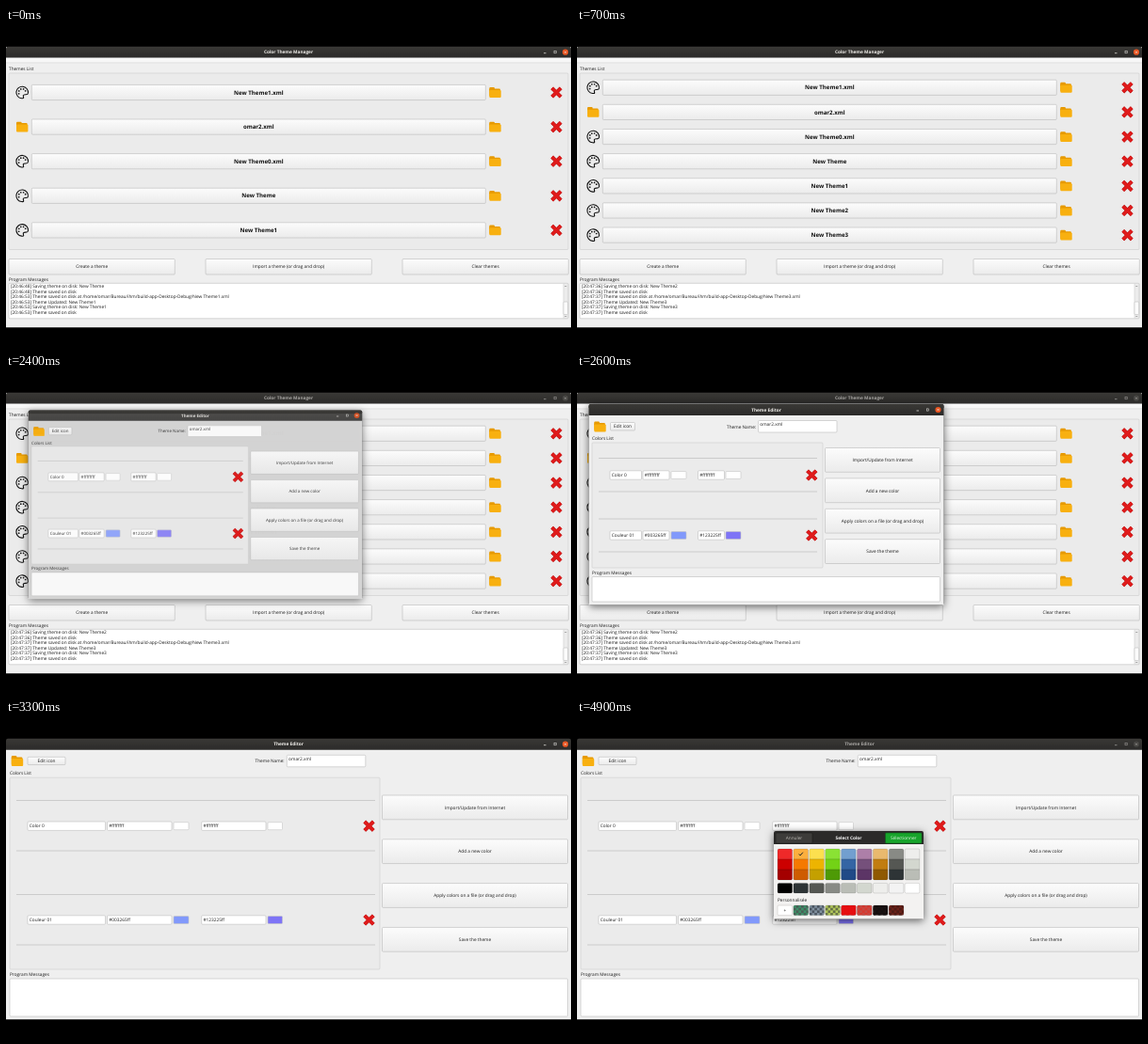
Animation, 600 px wide and 338 px high, one loop 5000 ms. Source, as an HTML page with a canvas:

```html
<!DOCTYPE html>
<html lang="en">
<head>
<meta charset="utf-8">
<title>Color Theme Manager</title>
<style>
  html, body { margin: 0; width: 100%; height: 100%; overflow: hidden; background: #000; }
  canvas { display: block; }
</style>
</head>
<body>
<canvas id="stage" width="600" height="338"></canvas>
<script>
const ctx = document.getElementById('stage').getContext('2d');
const LOOP = 5000, STEP = 100;
const BG = '#efefef', RED = '#e01b1b';
const USER = 'omar';

function rect(x, y, w, h, fill) {
  ctx.fillStyle = fill;
  ctx.fillRect(x, y, w, h);
}

function box(x, y, w, h, fill, stroke, r = 1) {
  ctx.beginPath();
  ctx.roundRect(x, y, w, h, r);
  ctx.fillStyle = fill;
  ctx.fill();
  if (!stroke) return;
  ctx.strokeStyle = stroke;
  ctx.lineWidth = 0.6;
  ctx.stroke();
}

function text(str, x, y, { size = 4.75, bold = false, align = 'left', color = '#1c1c1c' } = {}) {
  ctx.font = `${bold ? 'bold ' : ''}${size}px "Open Sans", sans-serif`;
  ctx.textRendering = 'geometricPrecision';
  ctx.textAlign = align;
  ctx.fillStyle = color;
  ctx.fillText(str, x, y + size * 0.36);
}

function line(points, color, width = 0.7) {
  ctx.beginPath();
  points.forEach(([x, y]) => ctx.lineTo(x, y));
  ctx.strokeStyle = color;
  ctx.lineWidth = width;
  ctx.stroke();
}

function button(label, x, y, w, h, style) {
  const g = ctx.createLinearGradient(0, y, 0, y + h);
  g.addColorStop(0, '#fcfcfc');
  g.addColorStop(1, '#ebebeb');
  box(x, y, w, h, g, '#b9b9b9');
  text(label, x + w / 2, y + h / 2, { align: 'center', ...style });
}

function field(label, x, y, w, h, textY = y + h / 2) {
  box(x, y, w, h, '#fff', '#bcbcbc');
  text(label, x + 1.8, textY);
}

function at(x, y, draw) {
  ctx.save();
  ctx.translate(x, y);
  draw();
  ctx.restore();
}

function folder(x, y) {
  at(x, y, () => {
    box(-6.2, -5.4, 5.6, 4, '#e79a00');
    box(-6.2, -4, 11.6, 8, '#e79a00');
    box(-6.2, -2.6, 12.4, 8, '#f8b010');
  });
}

function cross(x, y) {
  at(x, y, () => {
    for (const [color, width] of [['#b01515', 4], [RED, 3.2]]) {
      line([[-4.7, -4.7], [4.7, 4.7]], color, width);
      line([[-4.7, 4.7], [4.7, -4.7]], color, width);
    }
  });
}

function palette(x, y) {
  at(x, y, () => {
    ctx.beginPath();
    ctx.arc(0, 0, 6.3, 0.1, 1.5, true);
    ctx.bezierCurveTo(3, 6, -0.2, 3.8, 1.6, 2.6);
    ctx.bezierCurveTo(3, 1.6, 6, 3.4, 6.3, 0.6);
    ctx.strokeStyle = '#111';
    ctx.lineWidth = 1.1;
    ctx.stroke();
    ctx.fillStyle = '#111';
    for (const a of [-0.45, -1.2, -1.95, -2.7, -3.5]) {
      ctx.beginPath();
      ctx.arc(3.8 * Math.cos(a), 3.8 * Math.sin(a), 0.85, 0, 7);
      ctx.fill();
    }
  });
}

function titleBar(title, x, y, w, active) {
  const ink = active ? '#f4f2ee' : '#aaa8a5';
  const g = ctx.createLinearGradient(0, y, 0, y + 12);
  g.addColorStop(0, '#3a3936');
  g.addColorStop(1, '#2b2a29');
  box(x, y, w, 12, g, null, [2, 2, 0, 0]);
  text(title, x + w / 2, y + 6, { bold: true, align: 'center', color: ink });
  const cy = y + 6, right = x + w - 6;
  line([[right - 23, cy + 1], [right - 20.5, cy + 1]], ink);
  ctx.strokeStyle = ink;
  ctx.lineWidth = 0.5;
  ctx.strokeRect(right - 12, cy - 1.1, 2.2, 2.2);
  ctx.beginPath();
  ctx.arc(right, cy, 3.1, 0, 7);
  ctx.fillStyle = active ? '#e95420' : '#454441';
  ctx.fill();
  line([[right - 1.1, cy - 1.1], [right + 1.1, cy + 1.1]], ink, 0.6);
  line([[right - 1.1, cy + 1.1], [right + 1.1, cy - 1.1]], ink, 0.6);
}

const themes = ['New Theme1.xml', USER + '2.xml', 'New Theme0.xml',
  'New Theme', 'New Theme1', 'New Theme2', 'New Theme3'];

function logLines(count) {
  const stamps = { 4: '20:46:48', 5: '20:46:53', 6: '20:47:36', 7: '20:47:37' };
  const now = `[${stamps[count]}] `, before = `[${stamps[count - 1]}] `;
  const name = themes[count - 1];
  return [
    `${before}Saving theme on disk: ${themes[count - 2]}`,
    `${before}Theme saved on disk`,
    `${now}Theme saved on disk at /home/${USER}/Bureau/ihm/build-app-Desktop-Debug/${name}.xml`,
    `${now}Theme Updated: ${name}`,
    `${now}Saving theme on disk: ${name}`,
    `${now}Theme saved on disk`,
  ];
}

function manager(count, active) {
  rect(0, 20, 600, 298.5, BG);
  titleBar('Color Theme Manager', 0, 19.7, 600, active);
  rect(0, 31.7, 600, 5, '#f7f7f7');
  line([[0, 37], [600, 37]], '#d9d9d9');
  text('Themes List', 3, 43.3);
  box(3, 48, 594, 187.5, '#ebebeb', '#cdcdcd');
  const gap = 183 / count;
  for (let i = 0; i < count; i++) {
    const y = 141.7 + (i - (count - 1) / 2) * gap;
    (i === 1 ? folder : palette)(17.2, y);
    button(themes[i], 27.3, y - 8.1, 482, 16.2, { bold: true, size: 6.1, color: '#111' });
    folder(519.5, y);
    cross(584.5, y);
  }
  ['Create a theme', 'Import a theme (or drag and drop)', 'Clear themes']
    .forEach((label, i) => button(label, 3 + i * 209, 245.5, 176.3, 16.5));
  text('Program Messages', 3, 267);
  box(3, 271.3, 594, 37.5, '#fff', '#bcbcbc');
  logLines(count).forEach((str, i) => text(str, 5, 274.6 + i * 5.5));
  box(592, 271.6, 4.7, 37, '#ececec', '#d2d2d2', 0);
  box(592, 291, 4.7, 13.5, '#fbfbfb', '#bcbcbc');
  line([[593.4, 275], [594.3, 274], [595.2, 275]], '#555', 0.5);
  line([[593.4, 306], [594.3, 307], [595.2, 306]], '#555', 0.5);
}

// Each [a, b] pair is a start and an end coordinate.
const floating = {
  x: 12.5, y: 32, w: 377, h: 213.5,
  icon: [24.5, 56], edit: [35.5, 51.5, 26, 8.5], nameX: 159, nameField: [192.5, 49.5, 83.5, 12.5],
  left: 16, right: 385.5, listY: 68.7, group: [73, 206], groupRight: 261,
  rules: [89.5, 125, 154, 189], ruleX: [23, 255], rows: [107.5, 171.5],
  cols: [[35, 68.5], [70, 98], [100, 116], [128.5, 156.5], [158, 174]], crossX: 249.3,
  actionX: 263.5, actionY: 78.5, actionGap: 32.4, messages: [211, 215.5, 242],
};
const maximized = {
  x: 0, y: 19.7, w: 600, h: 298.8,
  icon: [12, 43.5], edit: [23, 39.3, 40, 8.3], nameX: 264.5, nameField: [298.3, 37.3, 83.5, 12.5],
  left: 4, right: 596.5, listY: 56.5, group: [61.2, 265], groupRight: 397,
  rules: [85.5, 139, 185.5, 239], ruleX: [11, 392], rows: [112.7, 212.5],
  cols: [[23, 105.5], [107.5, 176], [178, 194], [207.7, 276], [278, 293.5]], crossX: 385.5,
  actionX: 399.5, actionY: 80, actionGap: 46.8, messages: [270, 275, 315],
};
const colors = [
  ['Color 0', '#ffffffff', '#fff', '#ffffffff', '#fff'],
  ['Couleur 01', '#003265ff', '#8199fb', '#123225ff', '#7e74f6'],
];

function editor(l, active) {
  rect(l.x, l.y + 4, l.w, l.h - 4, BG);
  titleBar('Theme Editor', l.x, l.y, l.w, active);
  folder(...l.icon);
  button('Edit icon', ...l.edit);
  text('Theme Name:', l.nameX, l.nameField[1] + 6.4);
  field(USER + '2.xml', ...l.nameField, l.nameField[1] + 4.2);

  text('Colors List', l.left, l.listY);
  box(l.left, l.group[0], l.groupRight - l.left, l.group[1] - l.group[0], '#ebebeb', '#cdcdcd');
  for (const y of l.rules) line([[l.ruleX[0], y], [l.ruleX[1], y]], '#bebebe');
  l.rows.forEach((y, row) => {
    l.cols.forEach(([a, b], i) => {
      const value = colors[row][i];
      if (i === 2 || i === 4) box(a, y - 4, b - a, 8, value, '#c4c4c4');
      else field(value, a, y - 4.7, b - a, 9.4);
    });
    cross(l.crossX, y);
  });

  ['Import/Update from Internet', 'Add a new color',
    'Apply colors on a file (or drag and drop)', 'Save the theme']
    .forEach((label, i) =>
      button(label, l.actionX, l.actionY + i * l.actionGap, l.right - l.actionX, 25.8));
  const [labelY, top, bottom] = l.messages;
  text('Program Messages', l.left, labelY);
  box(l.left, top, l.right - l.left, bottom - top, '#fff', '#bcbcbc');
}

function withShadow(x, y, w, h) {
  ctx.save();
  ctx.shadowColor = 'rgba(0,0,0,.6)';
  ctx.shadowBlur = 9;
  ctx.shadowOffsetY = 2;
  box(x, y, w, h, '#2b2a29', null, 2);
  ctx.restore();
}

// Draws a layout stretched into another rectangle.
function fitted(l, r, alpha) {
  ctx.save();
  ctx.globalAlpha = alpha;
  ctx.translate(r.x, r.y);
  ctx.scale(r.w / l.w, r.h / l.h);
  ctx.translate(-l.x, -l.y);
  editor(l, true);
  ctx.restore();
}

function maximizing(p) {
  const r = {};
  for (const k of ['x', 'y', 'w', 'h']) r[k] = floating[k] + (maximized[k] - floating[k]) * p;
  withShadow(r.x, r.y, r.w, r.h);
  fitted(maximized, r, 1);
  fitted(floating, r, 0.14);
}

function popIn(cx, cy, scale, alpha, draw) {
  ctx.save();
  ctx.globalAlpha = alpha;
  ctx.translate(cx, cy);
  ctx.scale(scale, scale);
  ctx.translate(-cx, -cy);
  draw();
  ctx.restore();
}

const swatches = [
  ['#ef2929', '#cc0000', '#a40000'], ['#fcaf3e', '#f57900', '#ce5c00'],
  ['#fce04f', '#edb400', '#c4a000'], ['#8ae234', '#73d216', '#4e9a06'],
  ['#729fcf', '#3465a4', '#204a87'], ['#ad7fa8', '#75507b', '#5c3566'],
  ['#e9b96e', '#c17d11', '#8f5902'], ['#888a85', '#555753', '#2e3436'],
  ['#eeeeec', '#d3d7cf', '#babdb6'],
];
const greys = ['#000', '#2e3436', '#555753', '#888a85', '#babdb6', '#d3d7cf', '#eeeeec', '#f3f3f3', '#fff'];
const custom = [['#3d9068', '#4b5f57'], ['#8292a0', '#4c5560'], ['#b4c95c', '#667047'],
  ['#e60f12', '#e60f12'], ['#d8392f', '#c34b45'], ['#1c1212', '#141010'], ['#6a2118', '#4d1b15']];

function colorPicker(picked, hover) {
  const left = 213, pitch = 16.9, cell = 15.6;
  withShadow(209, 118, 159, 93.5);
  rect(209, 132, 159, 79.5, '#f3f2f1');
  box(211, 120, 39, 11, '#3d3c3a', '#1d1c1b');
  text('Annuler', 230.5, 125.5, { align: 'center', color: '#b9b7b3' });
  text('Select Color', 288.5, 125.5, { bold: true, align: 'center', color: '#fff' });
  box(327.5, 120, 38.5, 11, hover ? '#17a42b' : '#108a22', '#0b6418');
  text('Sélectionner', 346.7, 125.5, { align: 'center', color: '#e4f5e5' });

  swatches.forEach((shades, i) => shades.forEach((shade, j) => {
    const corners = j === 0 ? [1.5, 1.5, 0, 0] : j === 2 ? [0, 0, 1.5, 1.5] : 0;
    box(left + i * pitch, 137 + j * 11, cell, 11, shade, 'rgba(0,0,0,.2)', corners);
  }));
  greys.forEach((grey, i) => box(left + i * pitch, 173.4, cell, 10.6, grey, 'rgba(0,0,0,.2)', 1.5));
  const [x, y] = picked ? [237.7, 142.5] : [356, 178.6];
  line([[x - 2, y], [x - 0.6, y + 1.5], [x + 2.2, y - 1.8]], '#2b2a29', 1);

  text('Personnalisée', left, 190.8);
  box(left, 197, cell, 10.6, '#fff', '#c9c7c5');
  text('+', left + cell / 2, 202.3, { align: 'center' });
  custom.forEach(([light, dark], i) => {
    const cx = left + (i + 1) * pitch;
    ctx.save();
    box(cx, 197, cell, 10.6, light, 'rgba(0,0,0,.25)', 1.5);
    ctx.clip();
    for (let a = 0; a < 6; a++)
      for (let b = 0; b < 4; b++)
        if ((a + b) % 2) rect(cx + a * 2.7, 197 + b * 2.7, 2.7, 2.7, dark);
    ctx.restore();
  });
}

function draw(t) {
  rect(0, 0, 600, 338, '#000');
  if (t < 3300) manager(t < 100 ? 5 : t < 600 ? 6 : 7, t < 2300);

  if (t >= 3300) {
    editor(maximized, t < 4300);
  } else if (t >= 3200) {
    maximizing(0.89);
  } else if (t >= 2400) {
    const opening = t < 2500;
    popIn(201, 138.7, opening ? 0.94 : 1, opening ? 0.85 : 1, () => {
      withShadow(floating.x, floating.y, floating.w, floating.h);
      editor(floating, true);
    });
  }

  if (t >= 4400) {
    const opening = t < 4500;
    popIn(288.5, 164.7, opening ? 0.94 : 1, opening ? 0.85 : 1,
      () => colorPicker(t >= 4700, t >= 4800));
  }
  rect(0, 318.5, 600, 19.5, '#000');
}

const start = performance.now();
function tick() {
  const t = (performance.now() - start) % LOOP;
  draw(Math.floor(t / STEP) * STEP);
  requestAnimationFrame(tick);
}
tick();
</script>
</body>
</html>
```
